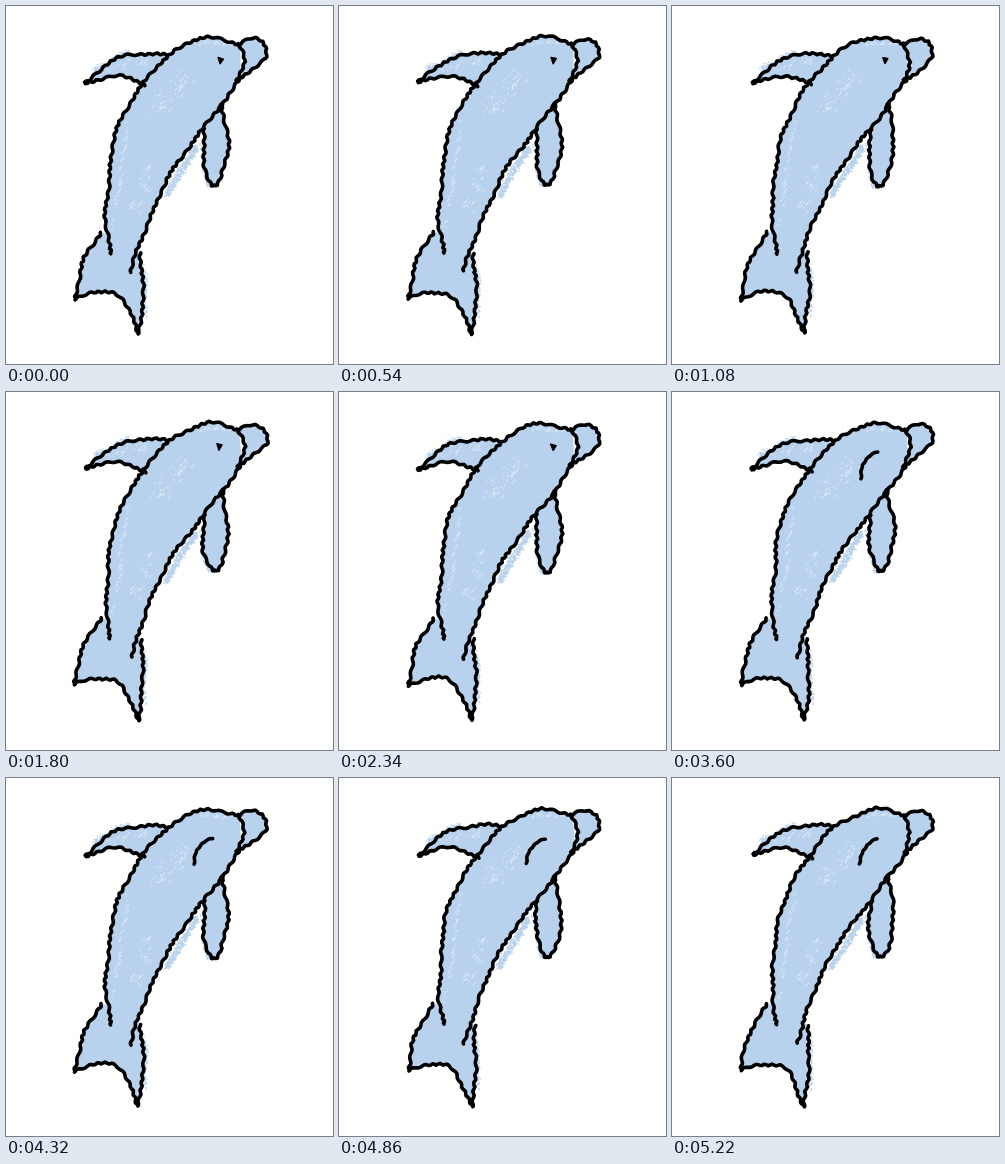
An HTML page with a canvas that plays this animation: 327 px wide and 358 px high, repeating every 5.4 s.

```html
<!DOCTYPE html>
<html lang="en">
<head>
<meta charset="utf-8">
<title>Dolphin</title>
<style>
html, body { margin: 0; width: 100%; height: 100%; overflow: hidden; background: #fff; }
canvas { display: block; }
</style>
</head>
<body>
<canvas id="stage" width="327" height="358"></canvas>
<script>
const ctx = document.getElementById('stage').getContext('2d');
const STEP = 180, STEPS = 30, BLINK = 15;
const BLUE = '#b8d2ed';

// Key points, as x,y pairs
const line = s => s.split(' ').map(p => p.split(',').map(Number));
const back = line('233,38 203,31 172,43 147,65 124,98 108,134 103,172 100,215 105,247');
const belly = line('235,72 216,99 184,140 165,167 149,199 134,236 125,266');
const beak = line('233,38 246,33 258,38 260,51 249,62 235,72');
const brow = line('233,38 238,55 232,74');
const finTop = line('160,49 141,47 108,54 80,77');
const finBase = line('80,77 110,70 140,79');
const sideFin = line('215,98 222,135 216,170 207,180 199,164 197,146 199,123');
const tailLeft = line('95,226 77,256 69,293');
const tailEdge = line('69,293 92,286 115,292 132,328');
const tailRight = line('132,328 137,293 136,265 135,247');
const eye = line('211,52 216,53 213,58 211,52');
const eyelid = line('206,61 199,64 190,75 188,86');

const outlines = [back, belly, beak, brow, finTop, finBase, sideFin,
  tailLeft, tailEdge, tailRight];
const areas = [[back, [...belly].reverse()], [beak, [...brow].reverse()],
  [finTop, finBase], [sideFin], [tailLeft, tailEdge, tailRight]];

// Crayon outside the lines: start, end, spread, dots
const spills = [
  [[190, 139], [159, 189], 4, 380], [[88, 64], [122, 46], 4, 200],
  [[196, 148], [202, 181], 3, 100], [[138, 258], [138, 308], 3, 100]
];
// Bare paper inside the lines: start, end, spread, scratches
const gaps = [
  [[182, 70], [150, 104], 13, 65], [[146, 160], [128, 205], 7, 40],
  [[122, 112], [105, 230], 3, 55], [[194, 38], [230, 38], 2, 25],
  [[95, 66], [140, 55], 5, 30]
];

function random(seed) {
  let a = seed * 7919 + 17;
  return () => {
    a = a + 0x6D2B79F5 | 0;
    let t = Math.imul(a ^ a >>> 15, 1 | a);
    t = t + Math.imul(t ^ t >>> 7, 61 | t) ^ t;
    return ((t ^ t >>> 14) >>> 0) / 4294967296;
  };
}

// Each step bends the whole drawing with waves of its own
function makeWarp(step) {
  const rnd = random(step + 1);
  const [a, b, c, d] = Array.from({ length: 4 }, () => rnd() * 2 * Math.PI);
  return ([x, y]) => [
    x + .65 * (Math.sin(y / 7 + a) + Math.sin((x + y) / 13 + b)),
    y + .65 * (Math.sin(x / 7 + c) + Math.sin((x - y) / 13 + d))
  ];
}

// Catmull-Rom curve sampled about every 2 px
function sample(pts) {
  const out = [], at = i => pts[Math.max(0, Math.min(pts.length - 1, i))];
  for (let i = 0; i < pts.length - 1; i++) {
    const [a, b, c, d] = [at(i - 1), at(i), at(i + 1), at(i + 2)];
    const n = Math.ceil(Math.hypot(c[0] - b[0], c[1] - b[1]) / 2);
    for (let k = 0; k < n; k++) {
      const t = k / n;
      out.push(b.map((v, j) => v + t / 2 * (c[j] - a[j]
        + t * (2 * a[j] - 5 * v + 4 * c[j] - d[j]
        + t * (3 * (v - c[j]) + d[j] - a[j])))));
    }
  }
  return [...out, at(pts.length - 1)];
}

// Uneven ripples across the direction of the line
function ripple(pts, seed, size) {
  return pts.map(([x, y], i) => {
    const p = pts[Math.max(0, i - 1)], q = pts[Math.min(pts.length - 1, i + 1)];
    const len = Math.hypot(q[0] - p[0], q[1] - p[1]) || 1;
    const off = size * Math.sin(i * 1.35 + 1.6 * Math.sin(i * .3 + seed));
    return [x - (q[1] - p[1]) / len * off, y + (q[0] - p[0]) / len * off];
  });
}

function trace(pts, warp) {
  ctx.beginPath();
  pts.forEach(p => ctx.lineTo(...warp(p)));
}

// Seeded points scattered around a straight run
function scatter([from, to, spread, count], warp, rnd, mark) {
  for (let i = 0; i < count; i++) {
    const t = rnd();
    mark(...warp(from.map((v, j) =>
      v + (to[j] - v) * t + (rnd() + rnd() - 1) * spread)));
  }
}

function crayon(warp) {
  const rnd = random(5);
  ctx.fillStyle = ctx.strokeStyle = BLUE;
  ctx.lineWidth = 2;
  for (const parts of areas) {
    trace(parts.flatMap(sample), warp);
    ctx.closePath();
    ctx.fill();
    ctx.stroke();
  }
  for (const spill of spills)
    scatter(spill, warp, rnd, (x, y) => ctx.fillRect(x, y, 1.4, 1.4));

  ctx.strokeStyle = '#fff';
  ctx.lineWidth = .8;
  for (const gap of gaps)
    scatter(gap, warp, rnd, (x, y) => {
      const len = .6 + 4 * rnd() ** 2;
      ctx.globalAlpha = .3 + .5 * rnd();
      ctx.beginPath();
      ctx.moveTo(x, y);
      ctx.lineTo(x + len * .65, y - len * .75);
      ctx.stroke();
    });
  ctx.globalAlpha = 1;
}

function draw(step) {
  const warp = makeWarp(step);
  ctx.fillStyle = '#fff';
  ctx.fillRect(0, 0, 327, 358);
  ctx.lineCap = ctx.lineJoin = 'round';
  crayon(warp);

  ctx.strokeStyle = ctx.fillStyle = '#000';
  ctx.lineWidth = 3.6;
  outlines.forEach((pts, i) => {
    trace(ripple(sample(pts), i, .9), warp);
    ctx.stroke();
  });
  if (step < BLINK) {
    trace(eye, warp);
    ctx.fill();
    ctx.lineWidth = 1.6;
  } else trace(ripple(sample(eyelid), 3, .4), warp);
  ctx.stroke();
}

let shown = -1;
function tick(now) {
  const step = Math.floor(now / STEP) % STEPS;
  if (step !== shown) draw(shown = step);
  requestAnimationFrame(tick);
}
tick(performance.now());
</script>
</body>
</html>
```
